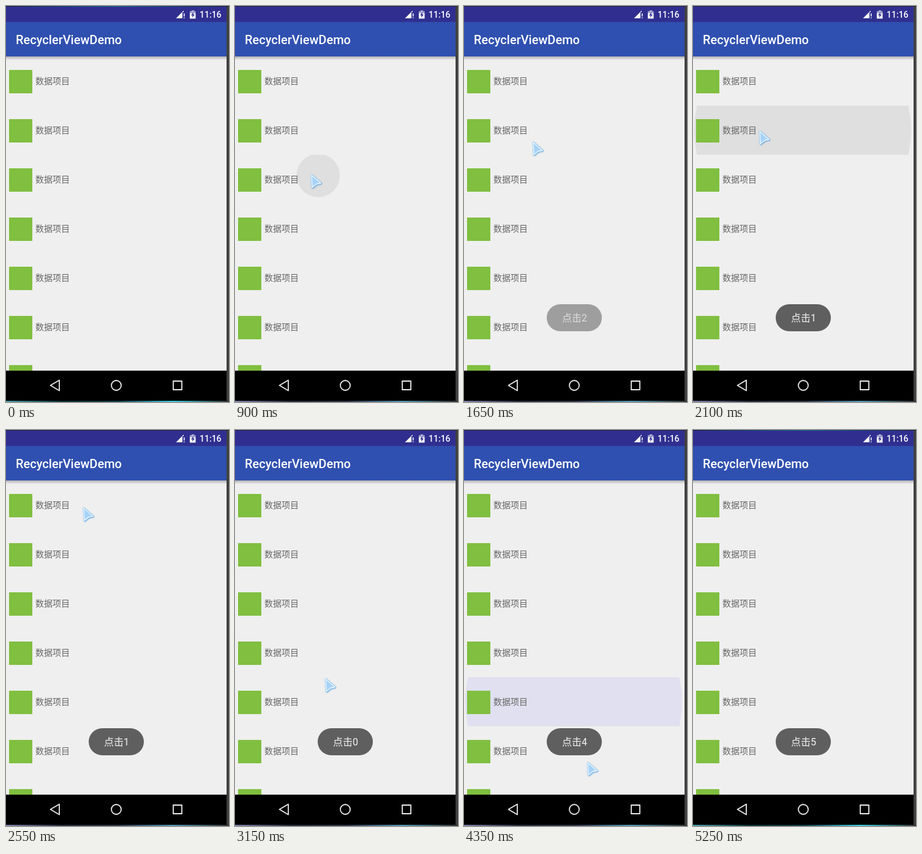
An HTML page with a canvas for the animation above (5.4 s loop, 364 by 644 pixels).

```html
<!DOCTYPE html>
<html lang="zh-CN">
<head>
<meta charset="utf-8">
<style>
html, body { margin: 0; width: 100%; height: 100%; overflow: hidden; background: #000; }
canvas { display: block; }
</style>
</head>
<body>
<canvas id="stage" width="364" height="644"></canvas>
<script>
const ctx = document.getElementById('stage').getContext('2d');
const LOOP = 5400, TICK = 150;
const ENTER = 150, LEAVE = 5250;
const ROW_TOP = 82, ROW_H = 80, LIST_W = 360, NAV_TOP = 593;
const HOLD_GROWTH = 750, RIPPLE_FADE = 300, TOAST_FADE = 540;
const CJK = '"Noto Sans CJK SC", "Noto Sans CJK", sans-serif';

// The pointer glides from tap to tap; each press grows a ripple, each release sets the toast.
const entry = { x: 232, y: 520, up: ENTER };
const taps = [
  { row: 2, x: 125, y: 274, down: 750, up: 1350 },
  { row: 1, x: 109, y: 203, down: 1950, up: 2100 },
  { row: 0, x: 128, y: 121, down: 2700, up: 2850 },
  { row: 3, x: 148, y: 404, down: 3150, up: 3750 },
  { row: 4, x: 132, y: 430, down: 3900, up: 4200 },
  { row: 5, x: 202, y: 540, down: 4350, up: 4650 }
];

const clamp = v => Math.min(1, Math.max(0, v));
const lerp = (a, b, p) => a + (b - a) * p;
const easeOut = p => 1 - (1 - p) ** 2;

function rect(x, y, w, h, color) {
  ctx.fillStyle = color;
  ctx.fillRect(x, y, w, h);
}

function text(str, x, y, font, color) {
  ctx.font = font;
  ctx.fillStyle = color;
  ctx.fillText(str, x, y);
}

function polygon(...points) {
  ctx.beginPath();
  points.forEach(([x, y]) => ctx.lineTo(x, y));
  ctx.closePath();
}

function circle(x, y, r) {
  ctx.beginPath();
  ctx.arc(x, y, r, 0, Math.PI * 2);
}

function gradient(x, y, ...colors) {
  const fill = ctx.createLinearGradient(0, 0, x, y);
  colors.forEach((color, i) => fill.addColorStop(i / (colors.length - 1), color));
  return fill;
}

function drawRipple({ row, x, y, down, up }, t) {
  if (t < down || t >= up + RIPPLE_FADE) return;
  const top = ROW_TOP + row * ROW_H;
  const grown = t < up ? (t - down) / HOLD_GROWTH : 1;
  ctx.save();
  ctx.beginPath();
  ctx.rect(0, top, LIST_W, ROW_H);
  ctx.clip();
  circle(lerp(x, 179, grown), lerp(y, top + ROW_H / 2, grown), 177 * grown);
  ctx.fillStyle = t > up ? 'rgba(90,90,240,0.1)' : 'rgba(0,0,0,0.066)';
  ctx.fill();
  ctx.restore();
}

function drawList(t) {
  rect(0, ROW_TOP, LIST_W, NAV_TOP - ROW_TOP, '#efefef');
  taps.forEach(tap => drawRipple(tap, t));
  for (let row = 0; row < 7; row++) {
    const top = ROW_TOP + row * ROW_H;
    rect(5, top + 22, 38, 38, '#80bf40');
    text('数据项目', 48, top + 45, '14px ' + CJK, '#666');
  }
}

function drawStatusIcons() {
  ctx.fillStyle = '#fff';
  polygon([277.5, 20], [290, 7.5], [290, 20]);
  ctx.fill();
  rect(288, 10, 4, 11, '#302f90');
  rect(290, 12, 1.5, 5, '#fff');
  rect(290, 18.5, 1.5, 1.5, '#fff');

  rect(303, 7, 4, 2, '#a9a8d0');
  rect(300, 8.5, 9.5, 4, '#a9a8d0');
  rect(300, 12, 9.5, 8.5, '#fff');
  ctx.fillStyle = '#302f90';
  polygon([306, 10], [302, 15.2], [304.5, 15.2], [304, 19], [308, 13.7], [305.5, 13.7]);
  ctx.fill();
}

function drawHeader() {
  const shadow = ctx.createLinearGradient(0, 82, 0, 88);
  shadow.addColorStop(0, 'rgba(0,0,0,0.26)');
  shadow.addColorStop(1, 'rgba(0,0,0,0)');
  rect(0, 82, LIST_W, 6, shadow);
  rect(0, 0, LIST_W, 26, '#302f90');
  rect(0, 26, LIST_W, 56, '#2f50b0');
  text('RecyclerViewDemo', 16, 62, '500 20px Roboto, sans-serif', '#fff');
  text('11:16', 316, 19, '500 14px Roboto, sans-serif', '#fff');
  drawStatusIcons();
}

function drawNavigation() {
  rect(0, NAV_TOP, LIST_W, 49, '#000');
  ctx.strokeStyle = '#e8e8e8';
  ctx.lineWidth = 1.8;
  ctx.lineJoin = 'round';
  polygon([72.5, 617], [87, 608.5], [87, 625.5]);
  ctx.stroke();
  circle(180, 617, 8);
  ctx.stroke();
  ctx.strokeRect(273, 610, 14, 14);
}

function drawEdges(pointerShown) {
  rect(LIST_W, 0, 4, 644, '#404040');
  const glow = pointerShown
    ? gradient(364, 0, '#7c80a8', '#262a3c', '#303448', '#5096b0', '#303030')
    : gradient(364, 0, '#48a0a8', '#103038', '#163c46', '#3cc8dc', '#303030');
  rect(0, 642, 364, 2, glow);
  rect(0, 0, 364, 1, pointerShown ? '#242438' : gradient(364, 0, '#101c28', '#1c7880', '#101c28'));
}

function drawToast(t) {
  const released = taps.filter(tap => tap.up < t || (tap.up === t && tap !== taps[0]));
  if (!released.length) return;
  const alpha = clamp((t - taps[0].up) / TOAST_FADE);
  ctx.globalAlpha = alpha;
  ctx.fillStyle = '#5f5f5f';
  ctx.beginPath();
  ctx.roundRect(135, 485, 90, 44, 22);
  ctx.fill();
  ctx.globalAlpha = Math.sqrt(alpha);
  text('点击' + released.pop().row, 160, 513, '16px Roboto, ' + CJK, '#f4f4f4');
  ctx.globalAlpha = 1;
}

function pointerAt(t) {
  const next = taps.findIndex(tap => t <= tap.up);
  if (next < 0) return taps[taps.length - 1];
  const from = taps[next - 1] || entry, to = taps[next];
  const p = easeOut(clamp((t - from.up) / (to.down - from.up)));
  return { x: lerp(from.x, to.x, p), y: lerp(from.y, to.y, p) };
}

function drawPointer({ x, y }) {
  ctx.save();
  ctx.translate(x, y + 1);
  ctx.lineJoin = 'round';
  polygon([0, 0], [15, 13], [8, 14.5], [1, 20]);
  ctx.shadowColor = 'rgba(60,140,215,0.7)';
  ctx.shadowBlur = 2;
  ctx.shadowOffsetX = ctx.shadowOffsetY = 1;
  ctx.strokeStyle = '#86c2f0';
  ctx.lineWidth = 2.6;
  ctx.stroke();
  ctx.shadowColor = 'transparent';
  ctx.fillStyle = '#a6d2f8';
  ctx.fill();
  ctx.strokeStyle = '#f2faff';
  ctx.lineWidth = 1.3;
  ctx.stroke();
  ctx.restore();
}

function draw(t) {
  const pointerShown = t >= ENTER && t < LEAVE;
  drawList(t);
  drawHeader();
  drawNavigation();
  drawEdges(pointerShown);
  drawToast(t);
  if (pointerShown) drawPointer(pointerAt(t));
}

const start = performance.now();
function frame() {
  const elapsed = (performance.now() - start) % LOOP;
  draw(Math.floor(elapsed / TICK) * TICK);
  requestAnimationFrame(frame);
}
frame();
</script>
</body>
</html>
```
